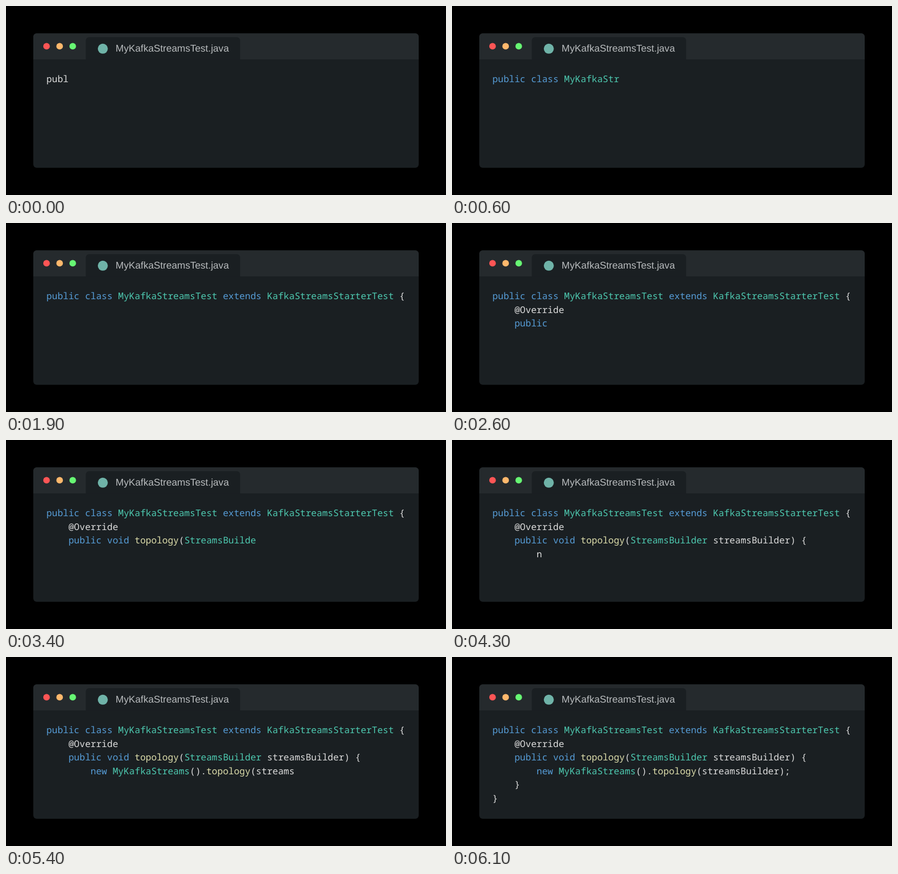
Recreate the animation shown at these times as an HTML page. Size 790 px wide and 340 px high, loop 7200 ms.

```html
<!DOCTYPE html>
<html lang="en">
<head>
<meta charset="utf-8">
<title>Typed code</title>
<style>
  html, body { margin: 0; width: 100%; height: 100%; overflow: hidden; background: #000; }
  svg { display: block; width: 790px; height: 340px; }
  text { white-space: pre; text-rendering: geometricPrecision; }
  .title { font: 17.6px "Liberation Sans", Arial, sans-serif; fill: #b8bbbd; }
  #code { font: 500 16.5px "Noto Sans Mono", "DejaVu Sans Mono", monospace; font-variant-ligatures: none; fill: #dcdcdc; }
  .keyword { fill: #569cd6; }
  .type { fill: #4ec9b0; }
  .method { fill: #dcdcaa; }
</style>
</head>
<body>
<svg viewBox="0 0 790 340">
  <rect width="790" height="340" fill="#000"/>
  <rect x="49" y="49.3" width="692" height="241.7" rx="6" fill="#1a1f22"/>
  <path d="M49 96V55.3a6 6 0 0 1 6-6H735a6 6 0 0 1 6 6V96Z" fill="#252a2d"/>
  <path d="M143.3 96.5V62a6 6 0 0 1 6-6H414.3a6 6 0 0 1 6 6V96.5Z" fill="#1a1f22"/>
  <circle cx="72.8" cy="72.4" r="5.9" fill="#ff5555"/>
  <circle cx="96.3" cy="72.4" r="5.9" fill="#ffb86c"/>
  <circle cx="119.8" cy="72.4" r="5.9" fill="#67f773"/>
  <circle cx="173.8" cy="76.8" r="9" fill="#6fb3a8"/>
  <text class="title" x="196.8" y="82">MyKafkaStreamsTest.java</text>
  <g id="code"></g>
</svg>
<script>
const LOOP = 7200, STEP = 100;
const LEFT = 72.6, ADVANCE = 9.9, BASELINE = 137, LINE_HEIGHT = 24.6;

const source = `public class MyKafkaStreamsTest extends KafkaStreamsStarterTest {
    @Override
    public void topology(StreamsBuilder streamsBuilder) {
        new MyKafkaStreams().topology(streamsBuilder);
    }
}`;

// Typing pace: [step, characters typed so far]
const pace = [[0, 4], [8, 30], [13, 48], [16, 58], [26, 91], [34, 118],
              [43, 147], [54, 183], [59, 199], [60, 200]];

const tokens = /@\w+|\b(?<keyword>public|class|extends|void|new)\b|\b(?<type>[A-Z]\w*)|(?<method>\w+)(?=\()/g;
const code = document.getElementById("code");
let shown = -1;

function typedAt(step) {
  const next = pace.findIndex(([s]) => s > step);
  if (next < 0) return source.length;
  const [s0, n0] = pace[next - 1], [s1, n1] = pace[next];
  return Math.floor(n0 + (n1 - n0) * (step - s0) / (s1 - s0) + 1e-6);
}

function highlight(line) {
  return line.replace(tokens, (word, ...rest) => {
    const groups = rest.at(-1);
    const kind = Object.keys(groups).find(name => groups[name]);
    return kind ? `<tspan class="${kind}">${word}</tspan>` : word;
  });
}

function renderLine(line, row) {
  const indent = line.search(/\S/);
  if (indent < 0) return "";
  const x = LEFT + indent * ADVANCE, y = BASELINE + row * LINE_HEIGHT;
  return `<text x="${x}" y="${y}">${highlight(line.trim())}</text>`;
}

function draw() {
  const count = typedAt(Math.floor(performance.now() % LOOP / STEP));
  if (count !== shown) {
    shown = count;
    code.innerHTML = source.slice(0, count).split("\n").map(renderLine).join("");
  }
  requestAnimationFrame(draw);
}
draw();
</script>
</body>
</html>
```
